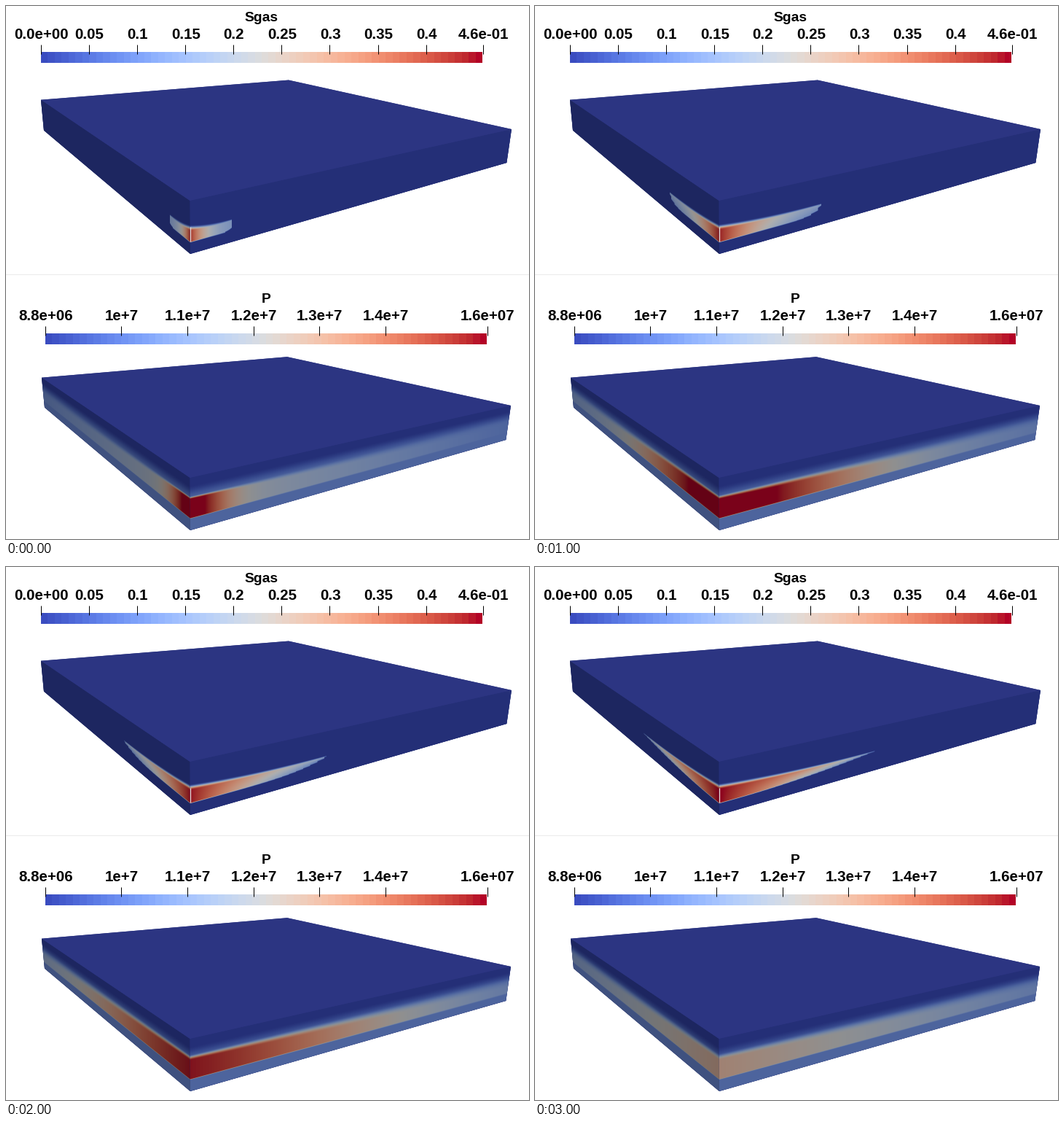
A matplotlib script that plays this animation: 718x731 px, repeating every 3500 ms.

```python
import numpy as np
import matplotlib.pyplot as plt
from matplotlib.animation import FuncAnimation
from matplotlib.patches import Polygon

W, H, DPI = 718, 731, 100
STEPS, STEP_MS = 7, 500
PX = 72 / DPI
CMAP = plt.get_cmap("coolwarm")
TOP_COLOR = (44 / 255, 53 / 255, 130 / 255)
SHUT_IN = 3  # step after which injection stops and pressure falls


def smooth(a, b, x):
    t = np.clip((x - a) / (b - a), 0, 1)
    return t * t * (3 - 2 * t)


def gas(u, v, k):
    """Gas saturation: a plume that slows down and thins out to its tip."""
    tip = .13 + .438 * (1 - np.exp(-.28 * k))
    q = u / tip
    qc = np.clip(q, 0, 1)
    cell = np.clip(np.floor(u / .022) * .022 / tip, 0, 1)
    bluntness = 16 / (1 + (k / 3) ** 2.6)
    top = .555 - (.09 + .008 * k) * (1 - qc) ** 2
    low = .78 - .225 * ((cell + qc) / 2) ** bluntness
    depth = np.clip((v - top) / np.maximum(low - top, .01), 0, 1)
    s = .45 + (.5 + .01 * k) * (1 - qc) ** (2.6 - .25 * k) - .12 * qc
    s = s + .05 * k * (.5 - depth) * np.minimum(1, 2 * qc)
    s = s * smooth(top - .01, top + .02 + .08 * (1 - qc), v)
    s = s * (1 - smooth(low - .012, low + .012, v))
    return np.where(q < 1, s, 0)


def pressure(u, v, k):
    """Pressure: a charged layer between a graded cap and a uniform base."""
    reach = .12 + .18 * k ** .75
    charge = .6 - .18 * max(0, k - SHUT_IN)
    layer = .56 - .3 * u - .06 * np.exp(-k)
    layer = np.minimum(1, layer + charge * np.exp(-(u / reach) ** 2))
    cap = .2 * smooth(.14, .42 + .1 * u, v)
    inside = smooth(.355 - .012 * k, .405 + .22 * u, v)
    s = cap + (layer - cap) * inside
    base = smooth(.765, .785 + .03 * u, v)
    return s + (.2 - s) * base


def gas_light(s, dark):
    return dark + .17 * np.minimum(1, 2 * s)


def pressure_light(s, dark):
    return dark + .06 * s


class Side:
    """A side face painted from a field; u runs from the near corner, v down."""

    def __init__(self, ax, near, far, field, light, dark, stretch):
        self.field, self.light, self.dark = field, light, dark
        (nt, nb), (ft, fb) = near, far
        pts = np.array([nt, ft, fb, nb])
        x0, y0 = np.floor(pts.min(axis=0)).astype(int) - 1
        x1, y1 = np.ceil(pts.max(axis=0)).astype(int) + 1
        x, y = np.meshgrid(np.arange(x0, x1, .5) + .25,
                           np.arange(y0, y1, .5) + .25)
        top = nt[1] + (x - nt[0]) * (ft[1] - nt[1]) / (ft[0] - nt[0])
        bot = nb[1] + (x - nb[0]) * (fb[1] - nb[1]) / (fb[0] - nb[0])
        self.u = np.clip((x - nt[0]) / (ft[0] - nt[0]), 0, 1) * stretch
        self.v = np.clip((y - top) / (bot - top), 0, 1)
        base = np.array(CMAP(0.0)[:3]) * dark
        patch = ax.add_patch(Polygon(pts, fc=base, ec="none", zorder=2))
        self.image = ax.imshow(self.paint(0), extent=(x0, x1, y1, y0),
                               aspect="auto", interpolation="nearest",
                               zorder=3)
        self.image.set_clip_path(patch)

    def paint(self, k):
        s = np.clip(self.field(self.u, self.v, k), 0, 1)
        rgb = CMAP(s)[..., :3] * self.light(s, self.dark)[..., None]
        h, w = s.shape
        return rgb.reshape(h // 2, 2, w // 2, 2, 3).mean(axis=(1, 3))

    def show(self, k):
        self.image.set_data(self.paint(k))


def draw_box(ax, left, back, right, near, field, light, stretch):
    """Each of left, right and near is a (top, bottom) pair of points."""
    outline = [left[0], back, right[0], right[1], near[1], left[1]]
    ax.add_patch(Polygon(outline, fc=TOP_COLOR, ec="none", zorder=1))
    sides = [Side(ax, near, left, field, light, .50, stretch),
             Side(ax, near, right, field, light, .62, 1)]
    ax.add_patch(Polygon([left[0], back, right[0], near[0]],
                         fc=TOP_COLOR, ec="none", zorder=4))
    return sides


def draw_legend(ax, title, title_x, x0, x1, y, labels):
    """Colour bar with its top at y; labels hold (text, tick x)."""
    ramp = CMAP(np.linspace(0, 1, 64))[None, :, :3]
    ax.imshow(ramp, extent=(x0, x1, y + 15, y), aspect="auto",
              interpolation="nearest", zorder=2)
    style = dict(family="Liberation Sans", weight="bold", color="black",
                 ha="center", va="baseline")
    ax.text(title_x, y - 42, title, size=19.3 * PX, **style)
    for text, tick in labels:
        ax.text(tick + .8, y - 18, text, size=20.5 * PX, **style)
        ax.plot([tick, tick], [y - 10, y + 3], color="black", lw=PX,
                solid_capstyle="butt", zorder=3)


fig = plt.figure(figsize=(W / DPI, H / DPI), dpi=DPI, facecolor="white")
ax = fig.add_axes([0, 0, 1, 1])

gas_labels = [(f"{.05 * i:.2f}".rstrip("0"), 47.5 + 66.15 * i)
              for i in range(1, 9)]
draw_legend(ax, "Sgas", 350.5, 48, 654, 63,
            [("0.0e+00", 47.5), *gas_labels, ("4.6e-01", 654.5)])

pressure_labels = [(f"{1 + i / 10:g}e+7", 158.3 + 90.6 * i)
                   for i in range(5)]
draw_legend(ax, "P", 357.5, 54, 660, 449,
            [("8.8e+06", 53.5), *pressure_labels, ("1.6e+07", 660.5)])

ax.plot([0, W], [367.5, 367.5], color="#ebebeb", lw=PX, zorder=1)

sides = draw_box(ax, ((48, 128.7), (52, 170.6)), (388, 101.6),
                 ((694, 169), (687.3, 215)), ((252.5, 267), (253, 340)),
                 gas, gas_light, .96)
sides += draw_box(ax, ((49, 509.7), (53, 550.6)), (386, 481.2),
                  ((693, 548), (686.3, 595)), ((252.5, 647), (253, 719)),
                  pressure, pressure_light, .88)

# Bright rim on the well corner.
ax.plot([253, 253], [303, 322.5], color="#e6dad6", lw=1.3 * PX,
        solid_capstyle="butt", zorder=5)

ax.set_xlim(0, W)
ax.set_ylim(H, 0)
ax.axis("off")


def update(k):
    for side in sides:
        side.show(k)
    return [side.image for side in sides]


anim = FuncAnimation(fig, update, frames=STEPS, interval=STEP_MS,
                     repeat=True, repeat_delay=0, blit=False)
plt.show()
```
